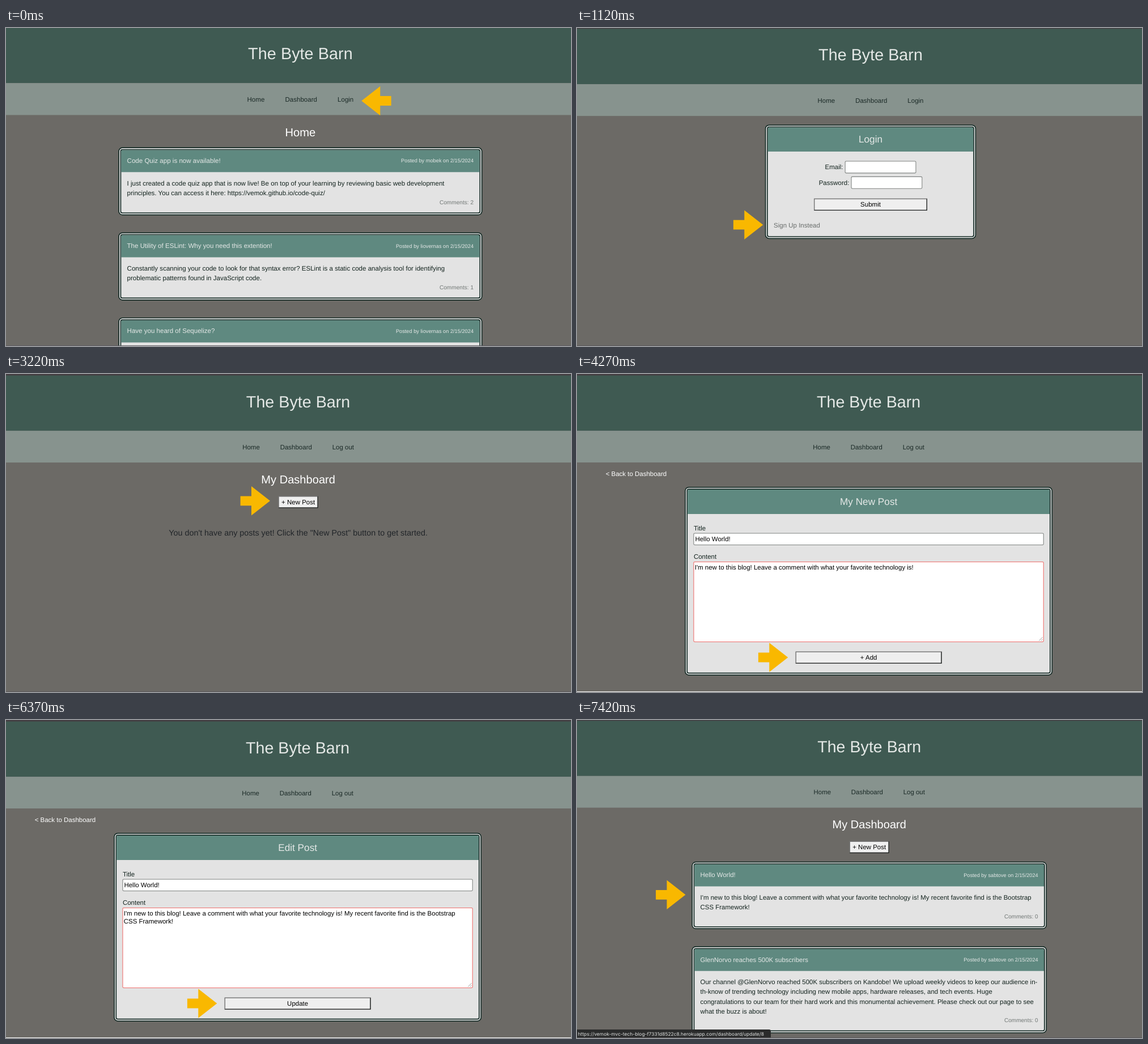
Animation, 997 px wide and 561 px high, one loop 8 s. Source, as an HTML page with a canvas:

```html
<!DOCTYPE html>
<html lang="en">
<head>
<meta charset="utf-8">
<title>Blog walkthrough</title>
<style>
  html, body { margin: 0; width: 100%; height: 100%; overflow: hidden; background: #6c6a66; }
  canvas { display: block; width: 997px; height: 561px; }
</style>
</head>
<body>
<canvas id="stage" width="997" height="561"></canvas>
<script>
const W = 997, H = 561, LOOP = 8000;
const ctx = document.getElementById('stage').getContext('2d');
const SANS = '"Liberation Sans", Arial, sans-serif';
const UI = 'Inter, "Open Sans", sans-serif';
const C = {
  header: '#3f5a52', nav: '#87938e', page: '#6c6a66', teal: '#5f8980', paper: '#e3e3e3',
  edge: '#162c27', ink: '#14241f', pale: '#e4e8e6', muted: '#727876', arrow: '#f9b800'
};

function text(str, x, y, size = 16, color = C.ink, align = 'left', family = SANS) {
  ctx.font = `${size}px ${family}`;
  ctx.textAlign = align;
  ctx.fillStyle = color;
  ctx.fillText(str, x, y);
}

function widthOf(str, size = 16) {
  ctx.font = `${size}px ${SANS}`;
  return ctx.measureText(str).width;
}

function rect(x, y, w, h, color) {
  ctx.fillStyle = color;
  ctx.fillRect(x, y, w, h);
}

function round(x, y, w, h, r, color) {
  ctx.fillStyle = color;
  ctx.beginPath();
  ctx.roundRect(x, y, w, h, r);
  ctx.fill();
}

// Page pixels, with the origin at the top centre of the page.
function pageSpace({ cx, top, scale }) {
  ctx.setTransform(scale, 0, 0, scale, cx, top);
}

function chrome(page, links) {
  rect(-900, 0, 1800, 136, C.header);
  rect(-900, 136, 1800, 78, C.nav);
  text('The Byte Barn', 0, 78.1, 40, C.pale, 'center');
  const gap = 50;
  const widths = links.map(l => widthOf(l));
  let x = -(widths.reduce((a, b) => a + b) + gap * (links.length - 1)) / 2;
  links.forEach((l, i) => {
    text(l, x, 181.3, 16, '#1b2a27');
    x += widths[i] + gap;
  });
}

// Double-bordered panel with a coloured head.
function panel(half, y, h, head) {
  const line = 7 / 3;
  [C.edge, C.paper, C.edge, C.paper].forEach((color, i) => {
    const d = line * i;
    round(-half + d, y + d, 2 * (half - d), h - 2 * d, 10 - d, color);
  });
  const d = line * 3;
  round(-half + d, y + d, 2 * (half - d), head - d, [3, 3, 0, 0], C.teal);
}

function post(half, y, { title, user, lines, comments }) {
  const left = -half + 21.2, right = half - 21.5;
  panel(half, y, 142.4 + 24 * (lines.length - 1), 61);
  text(title, left, y + 38.4, 16, C.pale);
  text(`Posted by ${user} on 2/15/2024`, right, y + 37.4, 12.8, C.pale, 'right');
  lines.forEach((l, i) => text(l, left, y + 93.7 + 24 * i));
  text(`Comments: ${comments}`, right, y + 115.3 + 24 * (lines.length - 1), 14, C.muted, 'right');
}

function button(label, half, y, h = 29.8) {
  rect(-half, y, 2 * half, h, '#767676');
  ctx.fillStyle = '#1c1f1e';
  ctx.beginPath();
  ctx.moveTo(half, y);
  ctx.lineTo(half, y + h);
  ctx.lineTo(-half, y + h);
  ctx.lineTo(-half + 2, y + h - 2);
  ctx.lineTo(half - 2, y + h - 2);
  ctx.lineTo(half - 2, y + 2);
  ctx.fill();
  rect(-half + 2, y + 2, 2 * half - 4, h - 4, '#efefef');
  text(label, 0, y + 20.4, 16, '#000', 'center');
}

function field(x, y, w, h, color = '#808482') {
  round(x, y, w, h, 3, color);
  round(x + 1.5, y + 1.5, w - 3, h - 3, 2, '#fff');
}

function account(title, rows, link) {
  const extra = 38 * rows.length;
  panel(259, 235.3, 204.5 + extra, 66.2);
  text(title, 0, 279.6, 24, C.pale, 'center');
  rows.forEach(([label, value], i) => {
    const name = label + ': ', w = widthOf(name), x = -(w + 175) / 2, y = 324.4 + 38 * i;
    text(name, x, y + 20.7);
    field(x + w, y, 175, 30.4);
    text(value, x + w + 4, y + 20.7, 16, '#000');
  });
  button('Submit', 139, 340.4 + extra);
  text(link, -237.8, 412 + extra, 16, '#696d6b');
}

function editor(heading, lines, action) {
  text('< Back to Dashboard', -647, 247.6, 16, '#fff');
  panel(452.5, 273.9, 464.3, 67);
  text(heading, 0, 318.6, 24, C.pale, 'center');
  text('Title', -430.5, 381.3);
  field(-431.2, 387.6, 862.4, 30);
  text('Hello World!', -427, 408.3, 16, '#000');
  text('Content', -430.5, 451);
  field(-431.2, 458, 862.4, 198, '#ee6f6c');
  lines.forEach((l, i) => text(l, -428, 478 + 18.4 * i, 16, '#000'));
  ctx.strokeStyle = '#777';
  ctx.lineWidth = 1;
  for (const d of [4, 9]) {
    ctx.beginPath();
    ctx.moveTo(428, 653 - d);
    ctx.lineTo(428 - d, 653);
    ctx.stroke();
  }
  button(action, 180, 679);
}

function heading(label) {
  text(label, 0, 265.3, 28, '#fff', 'center');
}

function dashboard() {
  heading('My Dashboard');
  button('+ New Post', 49, 296.3);
}

// dir is 1 for right, -1 for left.
function arrow(tip, y, dir = 1) {
  ctx.fillStyle = C.arrow;
  ctx.beginPath();
  [[0, 0], [33, -25.8], [33, -8.4], [52.4, -8.4], [52.4, 8.4], [33, 8.4], [33, 25.8]]
    .forEach(([dx, dy]) => ctx.lineTo(tip - dir * dx, y + dy));
  ctx.fill();
}

function status(id, w, y, scale) {
  round(0, y, w, 14, [0, 3, 0, 0], '#2a2b2b');
  const url = `https://vemok-mvc-tech-blog-f7331d8522c8.herokuapp.com/dashboard/update/${id}`;
  text(url, id === 6 ? 2.6 : 1.6, y + 10.7, 11.8 * scale, '#dfe1e0', 'left', UI);
}

const OUT = ['Home', 'Dashboard', 'Login'];
const IN = ['Home', 'Dashboard', 'Log out'];
const HELLO = "I'm new to this blog! Leave a comment with what your favorite technology is!";
const HELLO_LONG = [HELLO + ' My recent favorite find is the Bootstrap', 'CSS Framework!'];
const USER = 'sabtove';

const homePosts = [
  { title: 'Code Quiz app is now available!', user: 'mobek', comments: 2, lines: [
    'I just created a code quiz app that is now live! Be on top of your learning by reviewing basic web development',
    'principles. You can access it here: https://vemok.github.io/code-quiz/'] },
  { title: 'The Utility of ESLint: Why you need this extention!', user: 'liovernas', comments: 1, lines: [
    'Constantly scanning your code to look for that syntax error? ESLint is a static code analysis tool for identifying',
    'problematic patterns found in JavaScript code.'] },
  { title: 'Have you heard of Sequelize?', user: 'liovernas', comments: 0, lines: ['', ''] }
];

const ownPosts = [
  { title: 'Hello World!', user: USER, comments: 0, lines: HELLO_LONG },
  { title: 'GlenNorvo reaches 500K subscribers', user: USER, comments: 0, lines: [
    'Our channel @GlenNorvo reached 500K subscribers on Kandobe! We upload weekly videos to keep our audience in-',
    'th-know of trending technology including new mobile apps, hardware releases, and tech events. Huge',
    'congratulations to our team for their hard work and this monumental achievement. Please check out our page to see',
    'what the buzz is about!'] }
];

const scenes = [
  { at: 0, cx: 519.4, top: -1, scale: 0.722, links: OUT, foot: '#5d5b62',
    body() {
      heading('Home');
      homePosts.forEach((p, i) => post(444.8, 292.7 + 208 * i, p));
    },
    over() { arrow(627.3, 128.5, -1); } },
  { at: 1120, cx: 518, top: 1.3, scale: 0.719, links: OUT, foot: '#59575b',
    body() { account('Login', [['Email', ''], ['Password', '']], 'Sign Up Instead'); },
    over() { arrow(328.3, 347.2); } },
  { at: 2170, cx: 516.5, top: 2.6, scale: 0.7175, links: OUT, foot: '#59575b',
    body() {
      account('Sign Up', [['Username', USER], ['Email', USER + '@mail.test'], ['Password', '••••••••']], 'Login Instead');
    },
    over() { arrow(402, 339); } },
  { at: 3220, cx: 515.6, top: 2.6, scale: 0.7175, links: IN, foot: '#59575b',
    body() {
      dashboard();
      text("You don't have any posts yet! Click the \"New Post\" button to get started.", 0, 393, 20, '#212529', 'center');
    },
    over() { arrow(466, 223.8); } },
  { at: 4270, cx: 514.6, top: 2.6, scale: 0.717, links: IN, foot: '#fff',
    body() { editor('My New Post', [HELLO], '+ Add'); },
    over() { arrow(372.3, 500); } },
  { at: 5320, cx: 520.7, top: 0, scale: 0.724, links: IN, foot: '#5d5b62',
    body() {
      dashboard();
      post(436.3, 346.5, { ...ownPosts[0], lines: [HELLO] });
    },
    over() {
      arrow(196.2, 303.2);
      status(6, 346, 548.4, this.scale);
    } },
  { at: 6370, cx: 514.6, top: 2.6, scale: 0.717, links: IN, foot: '#fff',
    body() { editor('Edit Post', HELLO_LONG, 'Update'); },
    over() { arrow(372.3, 500); } },
  { at: 7420, cx: 515.7, top: 1.4, scale: 0.716, links: IN, foot: '#59575b',
    body() {
      dashboard();
      ownPosts.forEach((p, i) => post(437.6, 346.9 + 208.5 * i, p));
    },
    over() {
      arrow(191.5, 308.3);
      status(8, 342, 546, this.scale);
    } }
];

function draw(now) {
  const t = now % LOOP;
  const scene = scenes.findLast(s => s.at <= t);
  ctx.setTransform(1, 0, 0, 1, 0, 0);
  ctx.textRendering = 'geometricPrecision';
  rect(0, 0, W, H, C.page);
  rect(0, 0, W, 4, '#433d42');
  pageSpace(scene);
  chrome(scene, scene.links);
  scene.body();
  ctx.setTransform(1, 0, 0, 1, 0, 0);
  rect(0, H - 1, W, 1, scene.foot);
  scene.over();
}

const start = performance.now();
function tick() {
  draw(performance.now() - start);
  requestAnimationFrame(tick);
}
tick();
</script>
</body>
</html>
```
